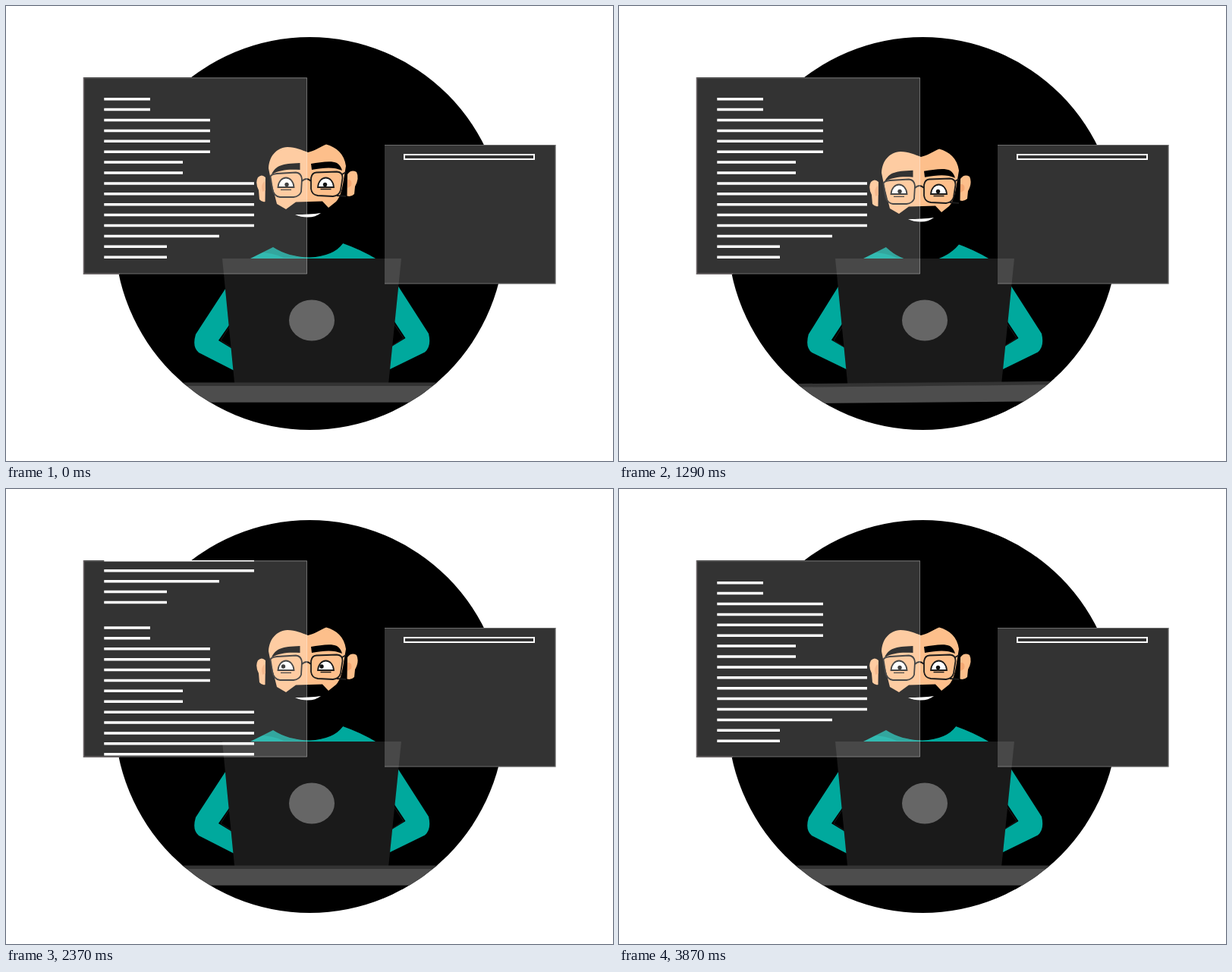
Recreate the animation shown at these times as an HTML page. Size 800x600 px, loop 4140 ms.

```html
<!DOCTYPE html>
<html lang="en">
<head>
<meta charset="utf-8">
<title>Developer at work</title>
<style>
html, body { margin: 0; width: 100%; height: 100%; overflow: hidden; background: #fff; }
svg { display: block; width: 800px; height: 600px; }
</style>
</head>
<body>
<svg viewBox="0 0 800 600">
  <defs>
    <ellipse id="disc" cx="400.300" cy="300" rx="257.300" ry="259"/>
    <clipPath id="discClip"><use href="#disc"/></clipPath>
    <rect id="codePane" x="102" y="94" width="295" height="259.500"/>
    <rect id="pagePane" x="499" y="183" width="225.500" height="183.500"/>
    <clipPath id="codeClip"><use href="#codePane"/></clipPath>
    <clipPath id="pageClip"><rect x="500" y="205" width="224" height="150"/></clipPath>
    <path id="lid" d="M285 333H521L504 499H301.300Z"/>
    <path id="dome" d="M-10.500 0C-10-8-5-12.500 0-12.500S10-8 10.500 0Z"/>
  </defs>

  <use href="#disc"/>
  <use href="#codePane"/>
  <use href="#pagePane"/>

  <g fill="#00a99d">
    <path d="M322 333L352 318Q372 331 400 331.500Q432 330 444 313Q467 321 488 333.500Z"/>
    <path id="leftArm" d="M291 370L250 433Q245 450 254 457L303 482V455L280 441L296 418V370Z"/>
    <path d="M516 368L557 432Q561 449 552 456.500L502 481V453L526.500 438L510 413Z"/>
  </g>
  <path d="M334 325L352 318Q372 331 400 332H366Q350 325 334 325Z" fill-opacity=".15"/>
  <path d="M295 422L283 441L297 450M512 420L524 438L509 448" fill="none" stroke="#222" stroke-width=".8"/>

  <g id="head">
    <ellipse cx="398.500" cy="281" rx="59" ry="50"/>
    <g fill="#fdbf8b">
      <path d="M342 226Q337 221 332 226Q328 233 333 243L334 255Q337 259 341.500 258Z"/>
      <path d="M450 222Q455 215 462 219Q466 227 460 238L459 248Q455 252 449.500 250.500Z"/>
      <path d="M349 229L346 214C347 198 356 187 371 186C382 186 390 190 398 193C407 191 414 186 422 182.500C435 186 446 195 448 211L444 235Q441 252 435 258L425 266L417 257.500L382 258.500L369 268L357 261Z"/>
    </g>
    <path d="M341 231Q335 235 338 245L342 243ZM450 229Q457 228 455 237L450 240Z" fill="#f5a873"/>
    <path d="M381 275Q400 275 415 273Q408 278.500 398 278.500Q388 278.500 381 275Z" fill="#fff"/>
  </g>
  <g id="brows">
    <path d="M350 222C356 210 363 208 387.500 207V216C372 215 361 216 350 222Z"/>
    <path d="M402 208C414 206 429 203.500 436 207Q441 210 443 217C432 212 420 213 403 216Z"/>
  </g>
  <g id="eyes" stroke="#1a1a1a" fill="none">
    <path d="M357 221L382 219.500Q389 220 390 228L389 245Q387 251 379 252L361 252Q353 251 351 241L348.500 225Q349 222 357 221ZM409 219.500L436 218.500Q444 219 443.500 227L441 243Q439 250 431 251L411 250Q403 249 402 241L402 227Q403 220 409 219.500ZM390 231Q396 225 402 231M443 222L448 219M436 250L448 251" stroke-width="1.800"/>
    <g fill="#fff" stroke-width="1.800">
      <use href="#dome" x="369" y="239"/>
      <use href="#dome" x="421.500" y="239"/>
    </g>
    <path d="M362 242.300H376M414.500 241.500H428.500" stroke-width="1.300"/>
    <g id="pupils" fill="#111" stroke="none">
      <circle cx="370" cy="235.500" r="2.700"/>
      <circle cx="420.500" cy="235.500" r="2.700"/>
    </g>
  </g>

  <use href="#lid"/>
  <g fill="#fff" fill-opacity=".2">
    <use href="#codePane"/>
    <use href="#pagePane"/>
  </g>
  <g fill="none" stroke="#fff" stroke-opacity=".28">
    <path d="M102 95H396.500V353H102"/>
    <path d="M499 183.500H724V366H499"/>
  </g>
  <path d="M102.500 94V353.300H150" fill="none" stroke="#6b6567" stroke-width="1.600"/>
  <use href="#lid" fill="#fff" fill-opacity=".1"/>
  <ellipse cx="403" cy="414.500" rx="30" ry="27" fill="#666"/>

  <g clip-path="url(#discClip)">
    <g id="desk">
      <rect x="120" y="496.500" width="560" height="5" fill="#333"/>
      <rect x="120" y="501" width="560" height="21.700" fill="#4d4d4d"/>
    </g>
  </g>

  <g clip-path="url(#codeClip)"><g id="code" stroke="#fff" stroke-width="3.500"></g></g>
  <g fill="none" stroke="#fff" stroke-width="2">
    <rect x="525" y="196" width="171" height="6"/>
    <g clip-path="url(#pageClip)"><g id="page"></g></g>
  </g>
</svg>
<script>
const LOOP = 4140, STEP = 30;
const CODE_TOP = 122.7, LINE_GAP = 13.9, CODE_PERIOD = 242;

const el = id => document.getElementById(id);
const make = (tag, attrs, parent) => {
  const node = document.createElementNS('http://www.w3.org/2000/svg', tag);
  for (const key in attrs) node.setAttribute(key, attrs[key]);
  return parent.appendChild(node);
};
const transform = (node, value) => node.setAttribute('transform', value);
const move = (id, x, y) => transform(el(id), `translate(${x} ${y})`);

function ease(t, start, end) {
  const u = Math.min(1, Math.max(0, (t - start) / (end - start)));
  return u * u * (3 - 2 * u);
}

function addBlock(y, end, count) {
  for (let i = 0; i < count; i++, y += LINE_GAP) {
    make('path', { d: `M129.3 ${y}H${end}` }, el('code'));
  }
  return y;
}

function addListing(top) {
  let y = addBlock(top, 190, 2);
  y = addBlock(y, 269, 4);
  y = addBlock(y, 233, 2);
  y = addBlock(y, 327, 5);
  y = addBlock(y, 281, 1);
  addBlock(y, 212, 2);
}
addListing(CODE_TOP);
addListing(CODE_TOP + CODE_PERIOD);

function addCard(x, y, width, height, start) {
  const node = make('rect', { width, height }, el('page'));
  return t => {
    const grow = ease(t, start, start + 420);
    transform(node, `translate(${x} ${y}) scale(${grow} 1)`);
    node.style.display = grow > 0 ? '' : 'none';
  };
}
const cards = [
  addCard(526, 209, 170, 42, 2805),
  addCard(621, 264, 75, 46, 2805),
  addCard(526, 264, 84, 89, 2880),
  addCard(621, 322, 75, 31, 2880)
];

function render(t) {
  const rise = ease(t, 1640, 1850);
  const nod = ease(t, 0, 360) - rise;
  const squint = ease(t, 560, 1100) - rise;
  move('head', 0, 6 * nod);
  move('brows', 0, 9.7 * nod);
  move('eyes', 0, 7 * nod + 2 * squint);
  transform(el('leftArm'), `rotate(${-1.2 * nod} 252 445)`);

  const lookX = -4.5 * ease(t, 1700, 2000) + 5.5 * ease(t, 2600, 2850) - ease(t, 3300, 3870);
  const lookY = -1.5 * (ease(t, 1800, 2100) - ease(t, 3300, 3870));
  move('pupils', lookX, lookY);

  // The desk rocks once while he types
  const tilt = t < 2160 ? 0.95 * Math.sin(2 * Math.PI * t / 2160) : 0;
  transform(el('desk'), `rotate(${tilt} 400 509)`);

  move('code', 0, -241 * ease(t, 1742, 2670));
  move('page', 0, -155 * ease(t, 3200, 3870));
  cards.forEach(update => update(t));
}

const origin = performance.now();
function tick() {
  const t = (performance.now() - origin) % LOOP;
  render(Math.floor(t / STEP) * STEP);
  requestAnimationFrame(tick);
}
render(0);
requestAnimationFrame(tick);
</script>
</body>
</html>
```
